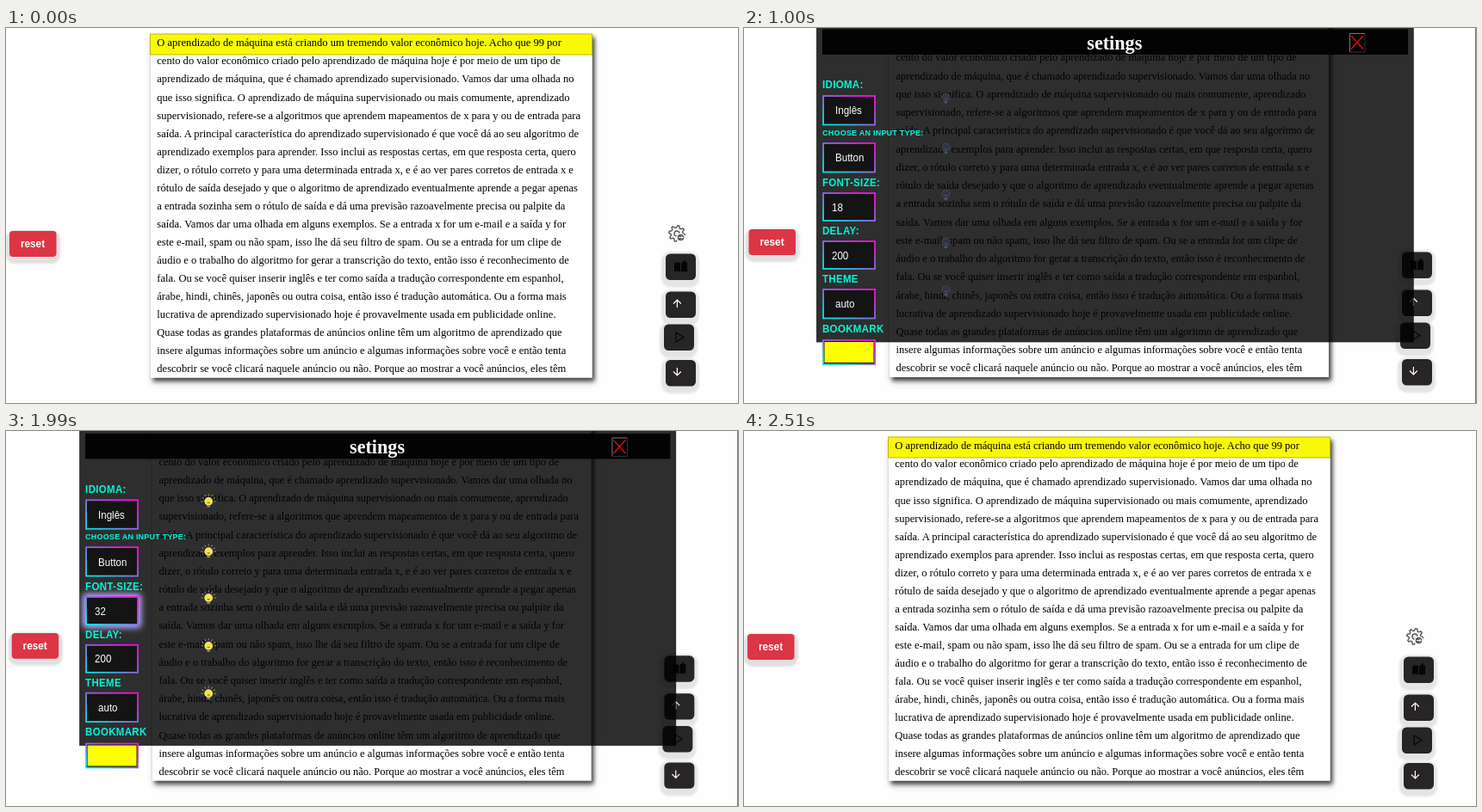
Recreate the animation shown at these times as an HTML page. Size 850 px wide and 436 px high, loop 2610 ms.

```html
<!DOCTYPE html>
<html lang="pt">
<head>
<meta charset="utf-8">
<style>
html, body { margin: 0; width: 100%; height: 100%; overflow: hidden; background: #fefefe; }
svg { display: block; width: 850px; height: 436px; }
.page { font-family: "Liberation Serif", "Times New Roman", serif; fill: #000; }
.title { font: bold 23.2px "Liberation Serif", "Times New Roman", serif; fill: #fff; text-anchor: middle; }
.ui { font: 12.1px "Liberation Sans", Arial, sans-serif; fill: #fff; }
.label { font: bold 12px "Liberation Sans", Arial, sans-serif; fill: #00f7d8; letter-spacing: .37px; }
.small { font-size: 9.4px; letter-spacing: .25px; }
.reset { font: bold 12.35px "Liberation Sans", Arial, sans-serif; fill: #fff; text-anchor: middle; }
.icon { fill: none; stroke: #fff; stroke-width: 1.2; }
.bulb { fill: #2d3640; stroke: #46525c; stroke-width: .8; }
.on .bulb { fill: #f0e352; stroke: #f8f08a; }
.cap { fill: #4d5358; }
.on .cap { fill: #8a8450; }
.ray { stroke: none; }
.on .ray { stroke: #c9b730; stroke-width: .8; }
.halo { fill: none; }
.on .halo { fill: #b4aeff; }
</style>
</head>
<body>
<svg id="stage" viewBox="0 0 850 436">
  <defs>
    <linearGradient id="neon" x1="0" y1="1" x2="1" y2="0">
      <stop offset=".1" stop-color="#16d9e3"/><stop offset=".5" stop-color="#8a6be0"/><stop offset=".9" stop-color="#f012e0"/>
    </linearGradient>
    <filter id="drop" x="-5%" y="-5%" width="112%" height="114%">
      <feDropShadow dx="3" dy="4" stdDeviation="2.8" flood-color="#000" flood-opacity=".7"/>
      <feDropShadow dx="0" dy="4" stdDeviation="3" flood-color="#000" flood-opacity=".16"/>
    </filter>
    <filter id="soft" x="-30%" y="-30%" width="160%" height="160%"><feGaussianBlur stdDeviation="1.2"/></filter>
    <filter id="glow" x="-30%" y="-50%" width="160%" height="200%"><feGaussianBlur stdDeviation="3.6"/></filter>
  </defs>
</svg>
<script>
const smallLines = `O aprendizado de máquina está criando um tremendo valor econômico hoje. Acho que 99 por
cento do valor econômico criado pelo aprendizado de máquina hoje é por meio de um tipo de
aprendizado de máquina, que é chamado aprendizado supervisionado. Vamos dar uma olhada no
que isso significa. O aprendizado de máquina supervisionado ou mais comumente, aprendizado
supervisionado, refere-se a algoritmos que aprendem mapeamentos de x para y ou de entrada para
saída. A principal característica do aprendizado supervisionado é que você dá ao seu algoritmo de
aprendizado exemplos para aprender. Isso inclui as respostas certas, em que resposta certa, quero
dizer, o rótulo correto y para uma determinada entrada x, e é ao ver pares corretos de entrada x e
rótulo de saída desejado y que o algoritmo de aprendizado eventualmente aprende a pegar apenas
a entrada sozinha sem o rótulo de saída e dá uma previsão razoavelmente precisa ou palpite da
saída. Vamos dar uma olhada em alguns exemplos. Se a entrada x for um e-mail e a saída y for
este e-mail, spam ou não spam, isso lhe dá seu filtro de spam. Ou se a entrada for um clipe de
áudio e o trabalho do algoritmo for gerar a transcrição do texto, então isso é reconhecimento de
fala. Ou se você quiser inserir inglês e ter como saída a tradução correspondente em espanhol,
árabe, hindi, chinês, japonês ou outra coisa, então isso é tradução automática. Ou a forma mais
lucrativa de aprendizado supervisionado hoje é provavelmente usada em publicidade online.
Quase todas as grandes plataformas de anúncios online têm um algoritmo de aprendizado que
insere algumas informações sobre um anúncio e algumas informações sobre você e então tenta
descobrir se você clicará naquele anúncio ou não. Porque ao mostrar a você anúncios, eles têm`.split("\n");
const largeLines = `O aprendizado de máquina está criando um tremendo
valor econômico hoje. Acho que 99 por cento do valor
econômico criado pelo aprendizado de máquina hoje é
por meio de um tipo de aprendizado de máquina, que é
chamado aprendizado supervisionado. Vamos dar uma
olhada no que isso significa. O aprendizado de
máquina supervisionado ou mais comumente,
aprendizado supervisionado, refere-se a algoritmos que
aprendem mapeamentos de x para y ou de entrada para
saída. A principal característica do aprendizado
supervisionado é que você dá ao seu algoritmo de`.split("\n");

// The whole screen is scaled a little less in x than in y.
const ASPECT = .956;

const rect = (x, y, w, h, fill, more = "") =>
  `<rect x="${x}" y="${y}" width="${w}" height="${h}" fill="${fill}" ${more}/>`;
const text = (cls, x, y, s, more = "") =>
  `<text class="${cls}" transform="translate(${x} ${y}) scale(${ASPECT} 1)" ${more}>${s}</text>`;

// Line height is 1.6 of the font size.
const page = (lines, size, x, y, sx, sy) =>
  `<g class="page" font-size="${size}" transform="translate(${x} ${y}) scale(${sx} ${sy})">` +
  lines.map((s, i) => `<text y="${i * size * 1.602}">${s}</text>`).join("") + "</g>";
const paper = (x, y, w, h) => rect(x, y, w, h, "#fff", 'filter="url(#drop)"');
const marker = (x, y, w, h) => rect(x, y, w, h, "#f9f906", 'stroke="#b9b70c"');

const reset = (x, y) =>
  rect(x - 4, y - 1, 63, 39, "#e0e0e0", 'rx="10" filter="url(#soft)"') +
  rect(x, y, 54.5, 30, "#dc3545", 'rx="4"') + text("reset", x + 27, y + 18.8, "reset");

const key = (x, y, icon) =>
  rect(x - 5, y - 2, 44, 41, "#e4e4e4", 'rx="11" filter="url(#soft)"') +
  rect(x, y, 35, 30.5, "#272526", 'rx="5.5"') + `<g transform="translate(${x} ${y})">${icon}</g>`;
const book = '<path d="M10 11q4-2 7 0v10q-3-2-7 0zM18 11l5-4v10l-5 4zM23 10h2v11q-4-1-7 0" fill="#050505"/>';
const up = '<path class="icon" d="M13.400 18.500v-9M9 14l4.400-4.500 4.400 4.500"/>';
const down = '<path class="icon" d="M13.400 9v9M9 13.500l4.400 4.500 4.400-4.500"/>';
const play = '<path d="M14 9.500v11l9-5.500z" fill="none" stroke="#080808" stroke-width="1.300"/>';
const keys = (x, ys) => [book, up, play, down].map((icon, i) => key(i == 2 ? x - 2 : x, ys[i], icon)).join("");

function gear(x, y) {
  const pts = [];
  for (let i = 0; i < 32; i++) {
    const a = (i + .5) * Math.PI / 16, r = i % 4 < 2 ? 9.3 : 6.8;
    pts.push((r * Math.cos(a)).toFixed(1) + "," + (r * Math.sin(a)).toFixed(1));
  }
  return `<g transform="translate(${x} ${y})" fill="none" stroke="#555" stroke-width="1.4">
    <polygon points="${pts.join(" ")}"/><circle r="3"/>
    <circle cx="4.500" cy="4.500" r="4.500" fill="#555" stroke="#fefefe"/>
    <path d="M2 4.500h5M5 2.500l2 2-2 2" stroke="#fff" stroke-width="1"/></g>`;
}

function bulb(y) {
  let rays = "";
  for (let i = 0; i < 7; i++)
    rays += `<path class="ray" d="M0-6.500v-2.300" transform="rotate(${i * 30 - 90})"/>`;
  return `<g transform="translate(234.300 ${y})">${rays}<circle class="bulb" r="4.500"/>
    <path class="cap" d="M-1.500 1h3v1.500h-3zM-1.800 4.500h3.600v2.500h-3.600z"/></g>`;
}

function field(y, h, x, s, id = "") {
  const halo = id ? `<rect class="halo" x="88" y="${y - 3}" width="68" height="${h + 6}" rx="4" filter="url(#glow)"/>` : "";
  return halo + rect(92, y + 1, 60, h - 2, "#141414", 'stroke="url(#neon)" stroke-width="1.8"') +
    text("ui", x, y + h / 2 + 4.7, s, id);
}

const small = paper(168, 6.5, 512.5, 400) + marker(167.5, 7, 513, 24) +
  page(smallLines, 18, 175.3, 21.4, .698, .73) +
  reset(4, 236) + gear(779, 239) + keys(766, [262.5, 306.5, 344.5, 386]);

const large = paper(168.5, 7, 510.5, 410.5) + marker(168, 7.5, 511, 41) +
  page(largeLines, 32, 176, 33.7, .697, .73) +
  reset(5.5, 236) + gear(777, 239) + keys(764, [262, 306, 343.5, 385]) +
  rect(849, 0, 1, 436, "#555");

const settings = paper(169, -20, 510, 426) + page(smallLines, 18, 176.5, 17.2, .693, .7365) +
  reset(5.5, 234) + keys(764, [260.5, 304.5, 342.5, 385]) +
  rect(84, -10, 693.8, 375.4, "rgba(0,0,0,.82)") +
  rect(91, 1.5, 680, 29.5, "#030303") + text("title", 430.3, 24.7, "setings") +
  '<path d="M703.500 28v-21.500h17.500" fill="none" stroke="#777"/><path d="M721 6.500v21.500h-17.500" fill="none" stroke="#333"/>' +
  '<path d="M705 9l14 15.500M719 9l-14 15.500" stroke="#e01010" stroke-width="1.300"/>' +
  [80.5, 139, 193, 249, 304.5].map(bulb).join("") +
  field(78, 35.5, 106, "Inglês") + field(133, 35.5, 106, "Button") +
  field(191, 34, 102, "18", 'id="size"') + field(247, 34, 102, "200") + field(303, 35.5, 106, "auto") +
  rect(92, 363, 60, 28, "#111", 'stroke="url(#neon)" stroke-width="1.800"') + rect(93.5, 365, 57, 24, "#ff0") +
  [["IDIOMA:", 70.3], ["FONT-SIZE:", 183.8], ["DELAY:", 239.8], ["THEME", 295.8], ["BOOKMARK", 353.8]]
    .map(([s, y]) => text("label", 91, y, s)).join("") +
  text("label small", 91, 125, "CHOOSE AN INPUT TYPE:");

const stage = document.getElementById("stage");
stage.insertAdjacentHTML("beforeend", [small, settings, large].map(s => `<g>${s}</g>`).join("") +
  rect(849, 0, 1, 436, "#777", 'id="edge"'));
const scenes = [...stage.children].filter(n => n.tagName == "g");
const panel = scenes[1], size = document.getElementById("size"), edge = document.getElementById("edge");

const LOOP = 2610, EDIT = 1900, END = 2510;

// Edit steps last 30 ms four times, then 30 and 40 ms in turn.
function editStep(t) {
  if (t < 120) return Math.floor(t / 30);
  const u = t - 120;
  return 4 + 2 * Math.floor(u / 70) + (u % 70 >= 30 ? 1 : 0);
}

function show(t) {
  const editing = t >= EDIT && t < END;
  const scene = editing ? 1 : t >= END ? 0 : Math.floor(t / 100) % 3;
  let k = 0, value = 18;
  if (editing) {
    const p = (editStep(t - EDIT) - 3) / 8;
    k = Math.min(1, .5 + p / 2);
    value = Math.round(32 - 14 * Math.min(1, Math.max(0, p)));
  }
  scenes.forEach((g, i) => g.setAttribute("visibility", i == scene ? "visible" : "hidden"));
  edge.setAttribute("visibility", scene == 1 ? "visible" : "hidden");
  panel.setAttribute("class", editing ? "on" : "");
  panel.setAttribute("transform", `matrix(${1 - .0022 * k} 0 0 ${1 - .0057 * k} ${2.4 * k} ${3.1 * k})`);
  size.textContent = value;
}

const start = performance.now();
function tick() {
  show((performance.now() - start) % LOOP);
  requestAnimationFrame(tick);
}
tick();
</script>
</body>
</html>
```
